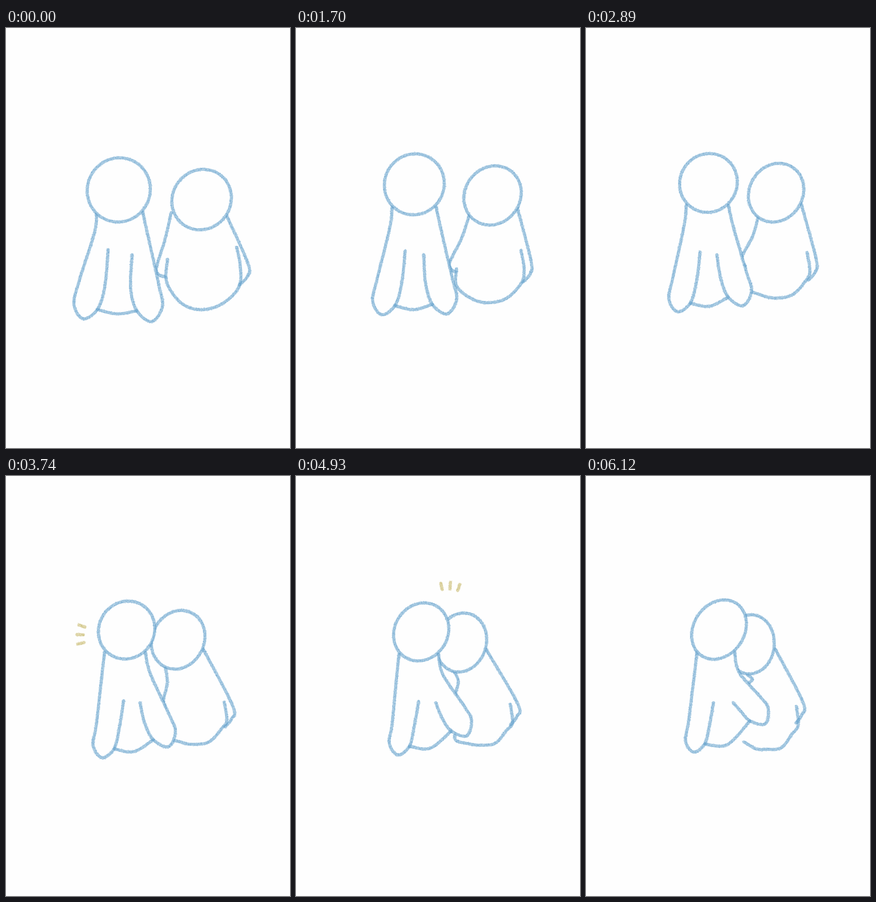
An HTML page with a canvas for the animation above (6.29 s loop, 617x908 px).

```html
<!DOCTYPE html>
<html lang="en">
<head>
<meta charset="utf-8">
<title>Two friends leaning in</title>
<style>
html, body { margin: 0; width: 100%; height: 100%; overflow: hidden; background: #fefefe; }
canvas { display: block; }
</style>
</head>
<body>
<canvas id="stage" width="617" height="908"></canvas>
<script>
const ctx = document.getElementById("stage").getContext("2d");
const STEP = 170, STEPS = 37, PAPER = "#fefefe";
const BLUE = "102,164,205", YELLOW = "200,184,108";

// Head centres at these steps.
const KEYS = [0, 5, 10, 17, 22, 29, 36];
const LEFT = [[245, 350], [267, 344], [257, 338], [266, 335], [262, 333], [272, 337], [289, 332]];
const RIGHT = [[425, 371], [428, 366], [427, 362], [413, 356], [374, 354], [359, 360], [357, 364]];

// Each burst is a fan of three ticks around a pivot.
const BURSTS = [
  { from: 13, pivot: [458, 349], angle: 0, drift: 4 },
  { from: 22, pivot: [229, 347], angle: Math.PI, drift: 4 },
  { from: 29, pivot: [331, 305], angle: -Math.PI / 2, drift: 10 }
];

const mix = (a, b, t) => a + (b - a) * t;
const between = (a, b, t) => [mix(a[0], b[0], t), mix(a[1], b[1], t)];
const shift = (a, dx, dy) => [a[0] + dx, a[1] + dy];

let seed = 1;
function rand() {
  seed = (seed * 16807) % 2147483647;
  return seed / 2147483647;
}

function along(path, step) {
  let k = 0;
  while (k < KEYS.length - 2 && step >= KEYS[k + 1]) k++;
  return between(path[k], path[k + 1], (step - KEYS[k]) / (KEYS[k + 1] - KEYS[k]));
}

// Catmull-Rom samples through the points.
function spline(...pts) {
  const out = [], last = pts.length - 1;
  const at = i => pts[Math.max(0, Math.min(last, i))];
  for (let i = 0; i < last; i++) {
    const a = at(i - 1), b = at(i), c = at(i + 1), d = at(i + 2);
    const count = Math.max(2, Math.ceil(Math.hypot(c[0] - b[0], c[1] - b[1]) / 2));
    for (let j = 0; j < count; j++) {
      const t = j / count;
      out.push([0, 1].map(m => b[m] + t / 2 * (c[m] - a[m] +
        t * (2 * a[m] - 5 * b[m] + 4 * c[m] - d[m] + t * (3 * (b[m] - c[m]) + d[m] - a[m])))));
    }
  }
  out.push(at(last));
  return out;
}

function oval([x, y], long, short, tilt) {
  const out = [];
  for (let i = 0; i <= 200; i++) {
    const a = i / 100 * Math.PI, u = short * Math.cos(a), v = long * Math.sin(a);
    out.push([x + u * Math.cos(tilt) - v * Math.sin(tilt), y + u * Math.sin(tilt) + v * Math.cos(tilt)]);
  }
  return out;
}

// From the shoulder around a rounded hand to the inner top; side is -1 or 1.
function arm(shoulder, neck, hand, r, top, side) {
  const mid = between(shoulder, top, .5);
  const len = Math.hypot(mid[0] - hand[0], mid[1] - hand[1]);
  const ux = (mid[0] - hand[0]) / len, uy = (mid[1] - hand[1]) / len;
  const spot = (across, up) => shift(hand,
    -uy * across * side * r + ux * up, ux * across * side * r + uy * up);
  const inner = spot(-1, 0);
  const line = spline(shoulder, neck, spot(1, .3 * len), spot(1, 0), spot(0, -r),
    inner, spot(-1.2, .3 * len), top);
  return { line, inner };
}

function trace(pts) {
  ctx.beginPath();
  pts.forEach(([x, y]) => ctx.lineTo(x, y));
}

function fill(pts) {
  trace(pts);
  ctx.fillStyle = PAPER;
  ctx.fill();
}

function crayon(pts, rgb = BLUE) {
  trace(pts);
  ctx.strokeStyle = `rgba(${rgb},.52)`;
  ctx.lineWidth = 6.6;
  ctx.stroke();
  ctx.fillStyle = `rgba(${rgb},.3)`;
  for (const [x, y] of pts) {
    for (let i = 0; i < 4; i++) {
      const a = rand() * Math.PI * 2, r = 4.3 * Math.sqrt(rand());
      ctx.fillRect(x + r * Math.cos(a) - .8, y + r * Math.sin(a) - .8, 1.6, 1.6);
    }
  }
}

function drawRight(step, p, late, dip) {
  const go = (a, b) => between(a, b, p);
  const head = along(RIGHT, step);

  const near = shift(head, mix(-66, -6, p), mix(28, 66, p));
  const wrist = [mix(327, 352, p), mix(518, 450, late)];
  crayon(spline(near, shift(between(near, wrist, .5), 2 + 8 * p, 0), wrist,
    shift(wrist, 6 - 6 * p, 16), shift(wrist, 19 - 25 * p, 20)));

  const base = [mix(422, 392, p), 609 - 18 * p - 18 * dip];
  const hip = [mix(506, 446, p), 560 - 15 * dip];
  const top = go([501, 474], [457, 498]);
  crayon(spline(go([351, 500], [343, 575]), go([349, 549], [348, 578]),
    shift(base, mix(-42, -22, p), mix(-15, -1, p)), base,
    shift(between(base, hip, .5), 5, 12), hip, shift(top, 8 - 4 * p, 40), top));

  const elbow = go([526, 510], [471, 488]), hand = go([507, 555], [456, 534]);
  crayon(spline(shift(head, 54, mix(34, 10, p)), elbow,
    [elbow[0] - 2, (elbow[1] + hand[1]) / 2 + 5], hand));

  const face = oval(head, 67 - 3 * p, 63 - 11 * p, .7 - .6 * p * p);
  fill(face);
  crayon(face);
}

function drawLeft(step, p, late, dip) {
  const go = (a, b) => between(a, b, p);
  const head = along(LEFT, step);
  const s1 = shift(head, -48, 48), s2 = shift(head, 52 - 18 * p, 48);

  const outer = arm(s1, shift(s1, -5, 45), go([173, 603], [237, 576]),
    mix(26, 21, p), go([222, 479], [277, 490]), -1);
  const inner = arm(s2, shift(s2, 10, 45), between([312, 607], [376, 516], late),
    mix(28, 24, p), [274 + 46 * p * p, 490], 1);
  const sag = 9 + .35 * (outer.inner[1] - inner.inner[1]);
  const belly = spline(outer.inner,
    shift(between(outer.inner, inner.inner, .5), 0, sag), inner.inner);
  const face = oval(head, 70 - 2 * p - 5 * dip, 68 - 13 * p, .6);

  fill([...outer.line, ...inner.line.slice().reverse()]);
  [outer.line, inner.line, belly].forEach(line => crayon(line));
  fill(face);
  crayon(face);
}

function drawBurst({ from, pivot, angle, drift }, step) {
  const n = step - from;
  if (n < 0 || n > 2) return;
  for (let i = -1; i <= 1; i++) {
    const a = angle + .28 * i + (angle ? .06 : 0);
    const point = r => shift(pivot, r * Math.cos(a), r * Math.sin(a));
    crayon(spline(point(61 + n * drift), point(75 + n * drift)), YELLOW);
  }
}

function draw(step) {
  const p = step / (STEPS - 1);
  const late = p ** 1.4, dip = Math.sin(Math.PI * p ** 1.3);
  seed = 4321 + step * 97;
  ctx.fillStyle = PAPER;
  ctx.fillRect(0, 0, 617, 908);
  ctx.lineCap = ctx.lineJoin = "round";
  drawRight(step, p, late, dip);
  drawLeft(step, p, late, dip);
  BURSTS.forEach(burst => drawBurst(burst, step));
}

const start = performance.now();
let shown = -1;
function tick() {
  const step = Math.floor((performance.now() - start) / STEP) % STEPS;
  if (step !== shown) draw(shown = step);
  requestAnimationFrame(tick);
}
tick();
</script>
</body>
</html>
```
